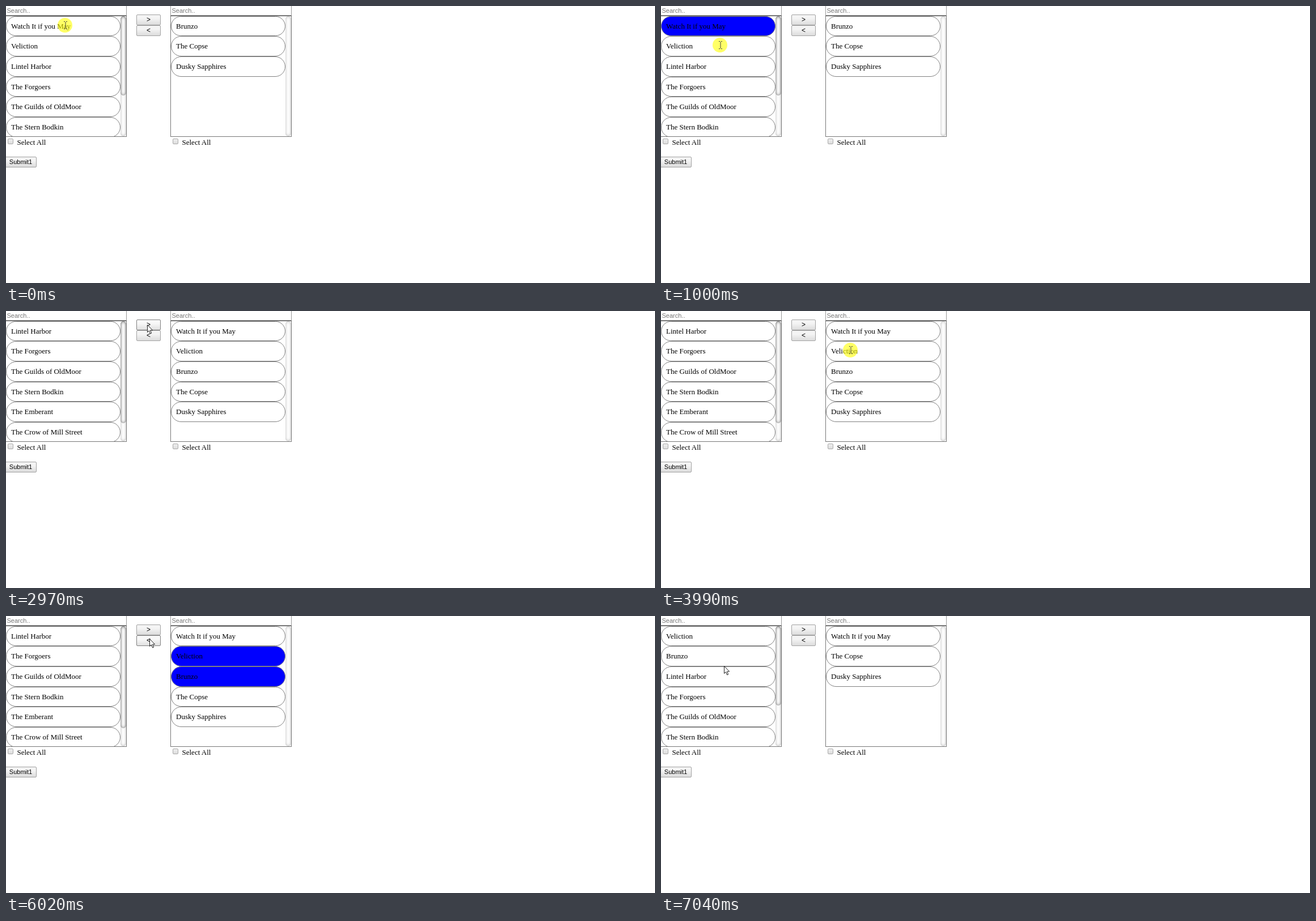
Animation, 1145 px wide and 489 px high, one loop 8 s. Source, as an HTML page:

```html
<!DOCTYPE html>
<html lang="en">
<head>
<meta charset="utf-8">
<title>Dual list box</title>
<style>
  html, body { margin: 0; width: 100%; height: 100%; overflow: hidden; background: #fff; }
  body * { position: absolute; box-sizing: border-box; white-space: nowrap; }
  body { position: relative; font: 13px "Liberation Serif", "Times New Roman", serif; color: #000; }
  .search, .button { font: 11px "Liberation Sans", Arial, sans-serif; }
  .panel { top: 0; width: 214px; height: 260px; }
  .search { top: -1px; width: 214px; height: 18px; padding-left: 1.5px; border: 1px solid #999; line-height: 17px; color: #777; }
  .list { top: 17px; width: 214px; height: 214px; border: 1px solid #777; overflow: hidden; }
  .list { border-top-color: #555; }
  .row { left: 0; width: 202px; padding-left: 8px; border: 1px solid #808080; border-radius: 18px; }
  .selected { background: #00f; }
  .track, .thumb { left: 202px; top: 0; width: 10px; height: 212px; border-radius: 9px; }
  .track { box-shadow: inset 0 0 5px rgba(0, 0, 0, .3); }
  .thumb { box-shadow: inset 0 0 5px rgba(0, 0, 0, .5); }
  .check { left: 4px; top: 234px; width: 10px; height: 10px; border: 1px solid #aaa; border-radius: 2px; background: linear-gradient(#eee, #ddd); }
  .all { left: 20.5px; top: 233px; line-height: 15px; }
  .button { height: 19px; line-height: 17px; text-align: center; border: 1px solid #a2a2a2; border-radius: 2px;
            background: linear-gradient(#f4f4f4 35%, #dcdcdc); }
  .move { left: 230px; width: 43px; font-size: 12px; }
  .hover { border-color: #808080; background: linear-gradient(#f8f8f8 35%, #e0e0e0); }
  #pointer { overflow: visible; width: 1px; height: 1px; }
</style>
</head>
<body>
<div class="panel" style="left:-1px"></div>
<div class="panel" style="left:290px"></div>
<div class="button move" style="top:15px">&gt;</div>
<div class="button move" style="top:34px">&lt;</div>
<div class="button" style="left:-2px;top:266px;width:56px">Submit1</div>
<svg id="pointer">
  <g id="beam">
    <circle r="13" fill="#ff0" fill-opacity=".6"/>
    <path d="M-2 -6.5H0M2 -6.5H4M-2 6.5H0M2 6.5H4M1 -6V6" fill="none" stroke="#444"/>
  </g>
  <path id="arrow" d="M.5 .5V13.5L3.4 10.8 5.6 16 7.7 15.1 5.5 10H9.6Z" fill="#fff" stroke="#222"/>
</svg>
<script>
const LOOP = 8000, VIEW = 212, PITCH = 35.65;
const films = ["Watch It if you May", "Veliction", "Lintel Harbor", "The Forgoers", "The Guilds of OldMoor",
  "The Stern Bodkin", "The Emberant", "The Crow of Mill Street", "The Tin Orchard"];
const owned = ["Brunzo", "The Copse", "Dusky Sapphires"];
const [first, second, ...rest] = films;
const [third, ...kept] = owned;

const before = [films, owned];
const added = [rest, [first, second, ...owned]];
const returned = [[second, third, ...rest], [first, ...kept]];

const steps = [
  { at: 0, lists: before, picked: [], x: 104, y: 34, beam: true },
  { at: 1000, lists: before, picked: [first], x: 104, y: 69, beam: true },
  { at: 1960, lists: before, picked: [first, second], x: 202, y: 35 },
  { at: 2970, lists: added, picked: [], x: 249, y: 24, hover: 0 },
  { at: 3990, lists: added, picked: [], x: 334, y: 69, beam: true },
  { at: 5000, lists: added, picked: [second], x: 328, y: 102, beam: true },
  { at: 6020, lists: added, picked: [second, third], x: 253, y: 40, hover: 1 },
  { at: 7040, lists: returned, picked: [], x: 111, y: 88 },
];

const panels = document.querySelectorAll(".panel");
const moves = document.querySelectorAll(".move");
const [pointer, beam, arrow] = ["pointer", "beam", "arrow"].map(id => document.getElementById(id));
const rowTop = i => Math.round(i * PITCH - 0.2);

function rowHtml(name, i, picked) {
  const top = rowTop(i), height = rowTop(i + 1) - top;
  const state = picked.includes(name) ? " selected" : "";
  return `<div class="row${state}" style="top:${top}px;height:${height}px;line-height:${height - 2}px">${name}</div>`;
}

function panelHtml(names, picked) {
  const content = names.length * PITCH;
  const thumb = content > VIEW ? `<div class="thumb" style="height:${VIEW * VIEW / content}px"></div>` : "";
  return `<div class="search">Search..</div>
    <div class="list">${names.map((name, i) => rowHtml(name, i, picked)).join("")}
      <div class="track"></div>${thumb}</div>
    <div class="check"></div><div class="all">Select All</div>`;
}

function show({ lists, picked, x, y, beam: isBeam, hover }) {
  panels.forEach((panel, i) => panel.innerHTML = panelHtml(lists[i], picked));
  moves.forEach((button, i) => button.classList.toggle("hover", i === hover));
  pointer.style.left = x + "px";
  pointer.style.top = y + "px";
  beam.style.display = isBeam ? "" : "none";
  arrow.style.display = isBeam ? "none" : "";
}

let current;
function tick() {
  const time = performance.now() % LOOP;
  const step = steps.findLast(s => s.at <= time);
  if (step !== current) show(current = step);
  requestAnimationFrame(tick);
}
tick();
</script>
</body>
</html>
```
